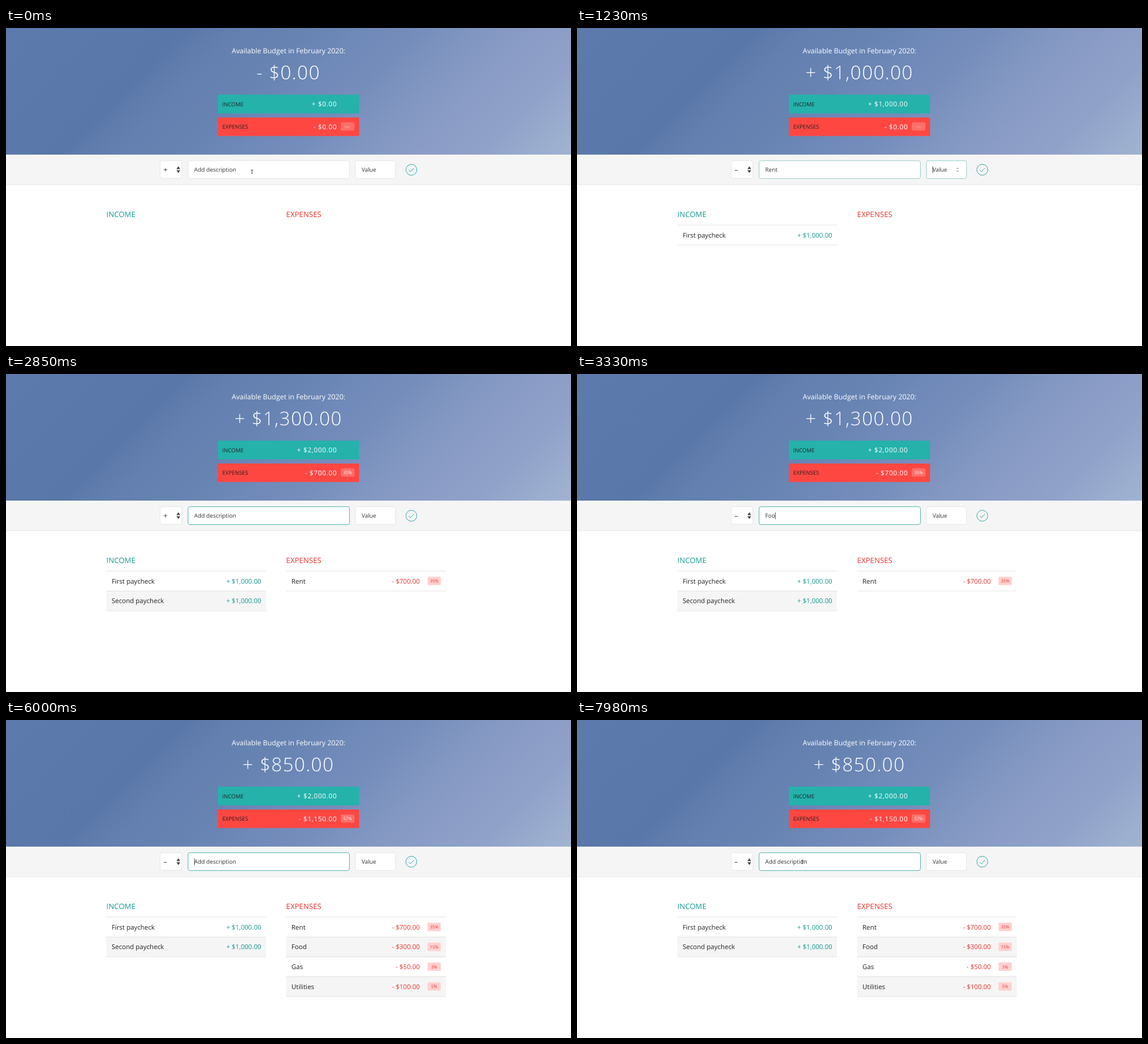
An HTML page that plays this animation: 960x540 px, repeating every 8 s.

```html
<!DOCTYPE html>
<html lang="en">
<head>
<meta charset="utf-8">
<title>Budget</title>
<style>
  html, body { margin: 0; width: 100%; height: 100%; overflow: hidden; background: #fff; }
  svg { display: block; width: 100vw; height: 100vh; }
  text { font-family: "Open Sans", sans-serif; white-space: pre; fill: #222; text-rendering: geometricPrecision; }
  .title { font-size: 11.95px; fill: #fff; text-anchor: middle; }
  .total { font-size: 32px; font-weight: 300; letter-spacing: 1.33px; fill: #fff; text-anchor: middle; }
  .label { font-size: 9.3px; }
  .sum { font-size: 11.33px; font-weight: 500; letter-spacing: .667px; fill: #fff; text-anchor: end; }
  .badge { font-size: 7.4px; font-weight: 500; text-anchor: middle; }
  .field { font-size: 9.7px; fill: #333; }
  .sign { font-size: 12px; }
  .head { font-size: 12.7px; }
  .row { font-size: 11.1px; }
  .end { text-anchor: end; }
  .inc { fill: #159b92; }
  .exp { fill: #f0322b; }
</style>
</head>
<body>
<svg id="stage" viewBox="0 0 960 540"></svg>
<script>
const LOOP = 8000, KEY = 26, PICK = 130, FADE = 60, BLINK = 260;
const TEAL = [60, 174, 165], GREY = [228, 228, 228];

// pick: sign menu opens; desc, num: typing starts; tab: value focused; add: submitted
const entries = [
  { kind: 'inc', name: 'First paycheck', amount: 1000, desc: 130, tab: 520, num: 560, add: 720 },
  { kind: 'exp', name: 'Rent', amount: 700, pick: 870, desc: 1070, tab: 1200, num: 1300, add: 1500 },
  { kind: 'inc', name: 'Second paycheck', amount: 1000, pick: 1680, desc: 2040, tab: 2460, num: 2530, add: 2700 },
  { kind: 'exp', name: 'Food', amount: 300, pick: 2880, desc: 3270, tab: 3450, num: 3540, add: 3780 },
  { kind: 'exp', name: 'Gas', amount: 50, desc: 4080, tab: 4230, num: 4340, add: 4620 },
  { kind: 'exp', name: 'Utilities', amount: 100, desc: 4980, tab: 5300, num: 5420, add: 5730 }
];

const focusLog = [[-1000, '']];
for (const e of entries) {
  if (e.pick) focusLog.push([e.pick, 'sign']);
  focusLog.push([e.desc - 40, 'desc'], [e.tab, 'value'], [e.add, 'desc']);
}

const mousePath = [
  [6300, 430, 245], [6500, 640, 330], [6800, 858, 480], [7100, 690, 110], [7300, 480, 70],
  [7400, 490, 72], [7650, 846, 490], [7850, 520, 300], [7960, 383, 241]
];

const stage = document.getElementById('stage');

function el(tag, attrs, parent = stage, content = '') {
  const node = document.createElementNS('http://www.w3.org/2000/svg', tag);
  for (const k in attrs) node.setAttribute(k, attrs[k]);
  if (content) node.textContent = content;
  parent.appendChild(node);
  return node;
}
const rect = (x, y, width, height, fill, more, parent) =>
  el('rect', { x, y, width, height, fill, ...more }, parent);
const text = (x, y, cls, content, parent) => el('text', { x, y, class: cls }, parent, content);
const show = (node, on) => node.setAttribute('display', on ? 'inline' : 'none');
const move = (node, x, y) => node.setAttribute('transform', `translate(${x} ${y})`);

function money(kind, n) {
  const s = n.toFixed(2).replace(/\B(?=(\d{3})+\.)/g, ',');
  return (kind === 'inc' ? '+ $' : '- $') + s;
}
const percent = (n, total) => Math.round(n / total * 100) + '%';

// Header
const grad = el('linearGradient', { id: 'sky', gradientUnits: 'userSpaceOnUse', x1: 0, y1: 0, x2: 587.5, y2: 587.5 }, el('defs', {}));
[[0, '#5d7aad'], [.2, '#5a78aa'], [.26, '#5977a9'], [.29, '#5e7bac'], [.34, '#6480b0'], [.43, '#6683b2'], [.52, '#6f89b8'],
 [.6, '#758dbb'], [.68, '#8096c1'], [.78, '#8b9dc6'], [.87, '#90a2c9'], [.93, '#98abcd'], [1, '#a0b4d0']]
  .forEach(([offset, color]) => el('stop', { offset, 'stop-color': color }, grad));
rect(0, 0, 960, 215.2, 'url(#sky)');
text(480, 43.2, 'title', 'Available Budget in February 2020:');
const total = text(479.7, 87.3, 'total');
rect(360, 113.2, 240, 31.8, '#24b2ab');
rect(360, 152, 240, 31.4, '#ff4742');
text(367.6, 132.5, 'label', 'INCOME');
text(367.6, 171.2, 'label', 'EXPENSES');
const incSum = text(562.4, 133.2, 'sum');
const expSum = text(562.4, 171.9, 'sum');
rect(568.8, 160.3, 23.2, 14, '#fff', { rx: 2, opacity: .22 });
const share = text(580.4, 170, 'badge');
share.style.fill = '#fff';

// Form
rect(0, 215.2, 960, 50.8, '#f5f5f5');
rect(0, 265.6, 960, 1, '#e4e4e4');
const box = (x, w, h) => rect(x, 225.3, w, h, '#fff', { rx: 3.3, stroke: '#e4e4e4', 'stroke-width': .9 });
box(261.8, 37, 30);
const boxes = { desc: box(309.3, 274.2, 30.4), value: box(593.7, 68.1, 30.4) };
const sign = text(267.5, 245, 'sign');
el('path', { d: 'M289.6 239.5h6.4l-3.2-4.8zM289.6 241.4h6.4l-3.2 4.8z', fill: '#444' });
const fields = { desc: text(319.8, 244.2, 'field'), value: text(604.2, 244.2, 'field') };
const spinner = el('path', { d: 'M644.8 239.6l1.8-2 1.8 2M644.8 242l1.8 2 1.8-2', fill: 'none', stroke: '#666', 'stroke-width': .9 });
const caret = rect(0, 235, .9, 11.5, '#333');
const check = el('g', { fill: 'none', stroke: '#28aaa1', 'stroke-width': .95 });
el('circle', { cx: 688.7, cy: 240.7, r: 9.3 }, check);
el('path', { d: 'M684.3 241.2l2.9 2.9 5.9-6.2' }, check);

// Lists
text(170.6, 320.7, 'head inc', 'INCOME');
text(476.1, 320.7, 'head exp', 'EXPENSES');
const count = { inc: 0, exp: 0 };
for (const e of entries) {
  const n = count[e.kind]++;
  const left = e.kind === 'inc' ? 170.5 : 476;
  const top = 334.4 + n * 33.7;
  const g = e.row = el('g', {});
  if (n % 2) rect(left, top, 271.3, 33.7, '#f5f5f5', {}, g);
  for (const y of [top, top + 33.7]) rect(left, y - .1, 271.3, .9, '#e2e2e2', {}, g);
  text(left + 9, top + 21.2, 'row', e.name, g);
  text(e.kind === 'inc' ? 433.6 : 703.2, top + 21.2, 'row end ' + e.kind, money(e.kind, e.amount), g);
  if (e.kind === 'exp') {
    rect(716.3, top + 9.9, 22.4, 14.2, '#ffd1cf', { rx: 1.5 }, g);
    e.badge = text(727.5, top + 19.8, 'badge exp', '', g);
  }
}

// Sign menu, drawn around its current item
const menu = el('g', {});
rect(250.5, 0, 54, 46, '#fff', { rx: 4, stroke: '#d0d0d0', 'stroke-width': .7 }, menu);
const marker = rect(250.5, 0, 54, 18, '#3b82f0', {}, menu);
const options = ['+', '–'].map((s, i) => text(267.5, 18 + i * 18, 'sign', s, menu));

// Mouse
const beam = el('path', { d: 'M-2 -2.8h4M0 -2.8v5.8M-1 3h2', fill: 'none', stroke: '#333', 'stroke-width': .9 });
const arrow = el('path', { d: 'M0 0v9l2.1-2 1.4 3 1.3-.6-1.4-2.9h2.9z', fill: '#111', stroke: '#fff', 'stroke-width': .6 });

const typed = (s, start, t) => s.slice(0, Math.max(0, Math.floor((t - start) / KEY) + 1));

function focusAt(t) {
  let i = focusLog.length - 1;
  while (focusLog[i][0] > t) i--;
  const [time, now] = focusLog[i];
  const before = i ? focusLog[i - 1][1] : '';
  const k = Math.min(1, (t - time) / FADE);
  const level = f => (f === now ? k : 0) + (f === before ? 1 - k : 0);
  return { time, now, level };
}

function mouseAt(t) {
  if (t < 100) return [418, 244];
  const i = mousePath.findIndex(p => p[0] > t);
  if (i === 0) return null;
  if (i < 0) return mousePath[mousePath.length - 1].slice(1);
  const [t0, x0, y0] = mousePath[i - 1], [t1, x1, y1] = mousePath[i];
  const u = (t - t0) / (t1 - t0), k = u * u * (3 - 2 * u);
  return [x0 + (x1 - x0) * k, y0 + (y1 - y0) * k];
}

function drawTotals(t) {
  const sum = { inc: 0, exp: 0 };
  for (const e of entries) {
    show(e.row, t >= e.add);
    if (t >= e.add) sum[e.kind] += e.amount;
  }
  for (const e of entries) if (e.badge) e.badge.textContent = percent(e.amount, sum.inc || 1);
  const left = sum.inc - sum.exp;
  total.textContent = money(left > 0 ? 'inc' : 'exp', Math.abs(left));
  incSum.textContent = money('inc', sum.inc);
  expSum.textContent = money('exp', sum.exp);
  share.textContent = sum.exp ? percent(sum.exp, sum.inc) : '---';
}

function drawForm(t) {
  const cur = entries.find(e => t < e.add);
  const focus = focusAt(t);
  const input = { desc: '', value: '' };
  let since = focus.time;
  if (cur) {
    input.desc = typed(cur.name, cur.desc, t);
    input.value = typed(String(cur.amount), cur.num, t);
    const start = focus.now === 'desc' ? cur.desc : cur.num;
    const n = (input[focus.now] || '').length;
    if (n) since = start + KEY * (n - 1);
  }
  fields.desc.textContent = input.desc || 'Add description';
  fields.value.textContent = input.value || 'Value';
  for (const f in boxes) {
    const k = focus.level(f);
    boxes[f].setAttribute('stroke', `rgb(${GREY.map((c, i) => Math.round(c + (TEAL[i] - c) * k))})`);
  }
  show(spinner, focus.now === 'value');

  const field = fields[focus.now];
  show(caret, field && (t - since) % BLINK < BLINK / 2);
  if (field) {
    const width = input[focus.now] ? field.getComputedTextLength() : 0;
    caret.setAttribute('x', +field.getAttribute('x') + width);
  }

  const picked = entries.filter(e => e.pick && t >= e.pick + PICK).pop() || entries[0];
  const minus = picked.kind === 'exp' ? 1 : 0;
  sign.textContent = minus ? '–' : '+';

  const open = entries.find(e => e.pick && t >= e.pick && t < e.pick + PICK);
  show(menu, open);
  if (open) {
    const at = t - open.pick < PICK / 2 ? minus : 1 - minus;
    move(menu, 0, minus ? 213.5 : 227);
    marker.setAttribute('y', 5 + at * 18);
    options.forEach((o, i) => { o.style.fill = i === at ? '#fff' : '#333'; });
  }
}

function drawMouse(t) {
  const p = mouseAt(t);
  const overInput = p && p[0] > 309 && p[0] < 584 && p[1] > 225 && p[1] < 256;
  show(beam, p && overInput);
  show(arrow, p && !overInput);
  if (p) move(overInput ? beam : arrow, p[0], p[1]);
}

function draw(t) {
  drawTotals(t);
  drawForm(t);
  drawMouse(t);
}

const begin = performance.now();
function tick() {
  draw((performance.now() - begin) % LOOP);
  requestAnimationFrame(tick);
}
tick();
</script>
</body>
</html>
```
